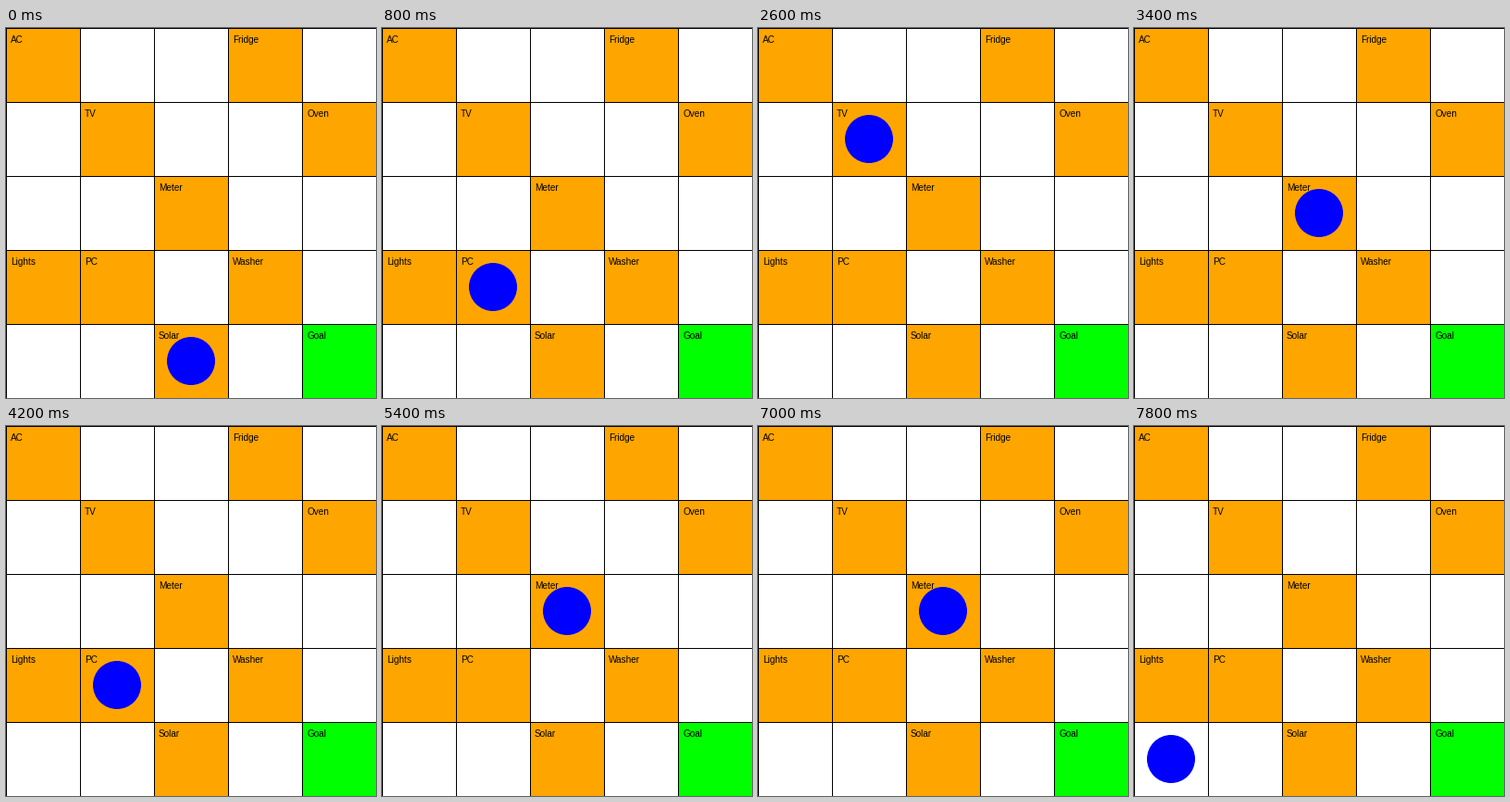
Recreate the animation shown at these times as a matplotlib script. Size 400x400 px, loop 8 s.

```python
import matplotlib.pyplot as plt
from matplotlib.animation import FuncAnimation
from matplotlib.patches import Circle, Rectangle

SIZE, CELLS = 400, 5
CELL = SIZE // CELLS
STEP_MS = 200

DEVICES = {
    "AC": (0, 0), "Fridge": (3, 0), "TV": (1, 1), "Oven": (4, 1),
    "Meter": (2, 2), "Lights": (0, 3), "PC": (1, 3), "Washer": (3, 3),
    "Solar": (2, 4), "Goal": (4, 4),
}
START = (2, 4)
MOVES = {"U": (0, -1), "D": (0, 1), "L": (-1, 0), "R": (1, 0), ".": (0, 0)}
# One letter per step; a dot is a step spent waiting.
ROUTE = "ULUDLD.RUUUUDDRLRDULDLDRUURRDUR..LLLDDL"


def walk(start, route):
    cells = [start]
    for move in route:
        (col, row), (dx, dy) = cells[-1], MOVES[move]
        cells.append((col + dx, row + dy))
    return cells


def center(cell):
    return tuple((i + 0.5) * CELL for i in cell)


def fill(ax, x, y, width, height, color):
    # Unsnapped fills on whole pixels stay crisp and exactly placed.
    ax.add_patch(Rectangle((x, y), width, height, fc=color, lw=0, snap=False))


def draw_board(ax):
    for name, (col, row) in DEVICES.items():
        x, y = col * CELL, row * CELL
        color = "#00ff00" if name == "Goal" else "#ffa500"
        fill(ax, x, y, CELL, CELL, color)
        ax.text(x + 5, y + 16.5, name, family="Liberation Sans", size=7.2,
                color="black", va="baseline", zorder=3)
    for edge in range(0, SIZE, CELL):
        fill(ax, edge, 0, 1, SIZE, "black")
        fill(ax, 0, edge, SIZE, 1, "black")


fig = plt.figure(figsize=(4, 4), dpi=100, facecolor="white")
ax = fig.add_axes([0, 0, 1, 1])
ax.set(xlim=(0, SIZE), ylim=(SIZE, 0))
ax.axis("off")
draw_board(ax)

path = walk(START, ROUTE)
agent = ax.add_patch(Circle(center(START), 26, fc="#0000ff", lw=0,
                            snap=False, zorder=4))


def update(frame):
    agent.center = center(path[frame])
    return (agent,)


anim = FuncAnimation(fig, update, frames=len(path), interval=STEP_MS,
                     repeat=True, repeat_delay=0)
plt.show()
```
